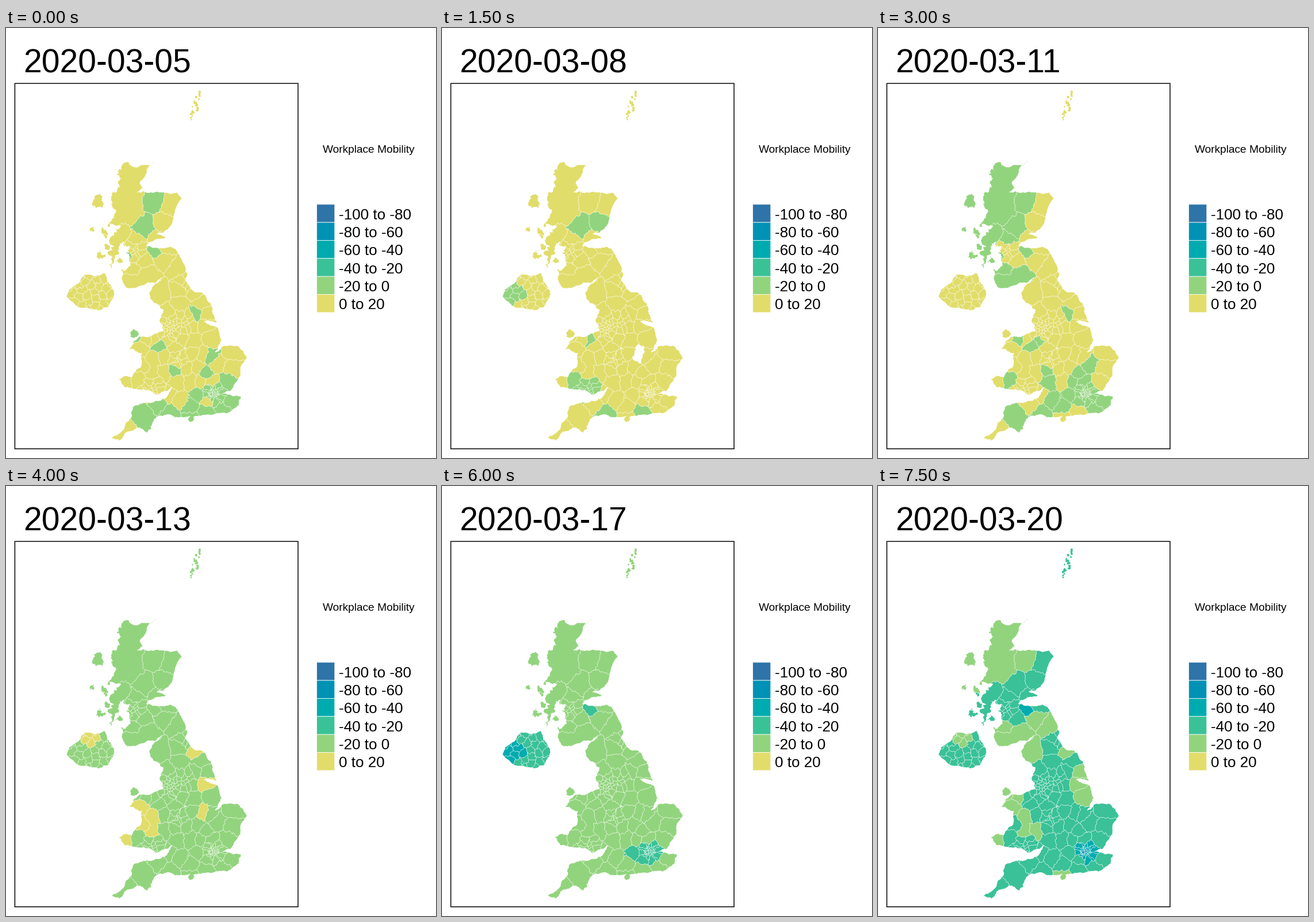
Animation, 748 px wide and 748 px high, one loop 8000 ms. Source, as a matplotlib script:

```python
import matplotlib.pyplot as plt
import numpy as np
from matplotlib.animation import FuncAnimation
from matplotlib.patches import Rectangle
from matplotlib.path import Path

SIZE, DPI, SS = 748, 100, 3
X0, Y0, W, H = 96, 100, 336, 630
PT = 72 / DPI
plt.rcParams["font.family"] = "Liberation Sans"
rng = np.random.default_rng(5)

PALETTE = ["#E2DD6A", "#92D47D", "#3AC297", "#00ABAF", "#0092B5", "#2E74A8"]


# --- Coast: a few capes and bays, roughened fractally ---
def coast(points, passes=4):
    p = np.reshape(points, (-1, 2)).astype(float)
    for _ in range(passes):
        q = np.roll(p, -1, 0)
        mid, step = (p + q) / 2, q - p
        fjord = (mid[:, 0] < 215) & (mid[:, 1] < 425) & (mid[:, 1] > 230)
        bend = np.where(fjord, .27, .09) * rng.standard_normal(len(p))
        mid += bend[:, None] * step[:, ::-1] * (1, -1)
        p = np.stack([p, mid], 1).reshape(-1, 2)
    return p


def island(x, y, r):
    a = np.arange(7) * 2 * np.pi / 7
    rad = r * rng.uniform(.6, 1.2, 7)
    return coast(np.c_[x + rad * np.cos(a), y + rad * np.sin(a)], 3)


east_coast = [
    204, 235, 266, 232, 233, 270, 238, 278, 228, 286, 250, 286, 298, 286,
    306, 296, 290, 335, 282, 350, 262, 358, 280, 364, 244, 379, 286, 380,
    300, 392, 313, 418, 322, 454, 347, 465, 357, 480, 367, 513, 345, 510,
    366, 520, 375, 543, 364, 564, 378, 553, 404, 553, 419, 574, 408, 605,
    391, 631, 376, 636, 409, 641, 405, 657, 384, 671]
west_coast = [
    335, 675, 304, 677, 265, 675, 246, 704, 228, 695, 198, 718, 183, 713,
    218, 678, 222, 658, 258, 650, 289, 625, 260, 638, 232, 629, 206, 625,
    196, 611, 234, 590, 236, 566, 214, 559, 232, 537, 262, 531, 274, 526,
    267, 507, 274, 490, 257, 478, 249, 460, 271, 434, 245, 444, 212, 453,
    201, 436, 216, 408, 209, 390, 215, 381, 205, 372, 192, 395, 182, 418,
    188, 380, 200, 344, 175, 345, 190, 322, 182, 300, 186, 285, 200, 262]
ulster = [105, 467, 137, 428, 172, 426, 189, 463, 178, 486, 154, 490, 127, 486]

shapes = [coast(east_coast + west_coast), coast(ulster)]
for skerry in ((160, 303, 13), (171, 356, 8), (150, 350, 5), (177, 382, 6),
               (164, 395, 8), (196, 405, 6), (224, 533, 9), (322, 680, 6)):
    shapes.append(island(*skerry))
for t in np.linspace(0, 1, 16):
    spread = 5 * np.sin(np.pi * t)
    shapes.append(island(337 - 15 * t + rng.normal(0, spread), 111 + 48 * t,
                         rng.uniform(2, 4.5)))

# --- Districts: nearest centre wins ---
scotland = dict(
    Highland=(225, 250, 215, 290, 215, 322, 160, 310, 182, 336),
    Moray=(261, 298), Aberdeen=(285, 305), Angus=(275, 342), Perth=(240, 348),
    Argyll=(200, 360, 165, 385, 190, 403), Stirling=(225, 370), Fife=(264, 367),
    Edinburgh=(259, 386), ELothian=(277, 384), Borders=(275, 402),
    Lanark=(240, 400), NAyrshire=(213, 395), Ayrshire=(215, 418),
    Dumfries=(215, 440, 248, 430), Shetland=(325, 135))
wales = dict(
    Anglesey=(224, 533), Gwynedd=(235, 558), Conwy=(246, 540),
    Denbigh=(258, 543), Wrexham=(266, 551), Powys=(256, 575, 256, 605),
    Ceredigion=(236, 588), Pembroke=(206, 612), Carmarthen=(230, 610))
north = dict(
    Northumberland=(299, 418), Cumbria=(268, 460), Durham=(303, 455),
    Teesside=(328, 461), NYorks=(305, 480, 338, 478), ERiding=(347, 498),
    York=(330, 497), Humber=(346, 516), Lincoln=(357, 540),
    Lancashire=(281, 498), Cheshire=(280, 541), Derby=(307, 540), Notts=(325, 545))
middle = dict(
    Staffs=(294, 557), Shropshire=(275, 572), Hereford=(275, 600),
    Worcester=(294, 594), Warwick=(313, 591), Leicester=(325, 567),
    Rutland=(343, 570), Northants=(333, 588), Peterborough=(355, 573),
    Cambridge=(365, 585), Norfolk=(395, 563), Suffolk=(393, 592),
    Essex=(385, 614), Bedford=(348, 602), Herts=(358, 616), Bucks=(338, 615))
south = dict(
    Oxford=(321, 615), Gloucester=(298, 616), Bristol=(282, 637),
    Wiltshire=(302, 647), Somerset=(265, 653), Devon=(240, 674),
    Cornwall=(205, 700), Dorset=(285, 670), Hampshire=(322, 658),
    WSussex=(348, 666), ESussex=(378, 664), Surrey=(351, 648),
    Kent=(390, 650), Berkshire=(335, 637), Wight=(322, 680))
# Dense groups of small districts: x, y, radius, count
clusters = dict(
    Glasgow=(225, 388, 10, 9), Tyne=(315, 442, 6, 5), Leeds=(311, 513, 13, 11),
    Manchester=(285, 522, 15, 24), Birmingham=(299, 577, 8, 9),
    SWales=(256, 627, 13, 12), London=(361, 635, 10, 36), Ulster=(148, 459, 40, 30))

centres = [(name, xy) for area in (scotland, wales, north, middle, south)
           for name, flat in area.items() for xy in np.reshape(flat, (-1, 2))]
for name, (x, y, radius, n) in clusters.items():
    for i in range(n):
        r, a = radius * ((i + .5) / n) ** .5, 2.4 * i
        part = name
        if name == "Ulster":
            part += "ESWN"[int(a / (np.pi / 2) + .5) % 4]
        elif name == "London" and r < 4:
            part = "City"
        centres.append((part, (x + r * np.cos(a), y + r * np.sin(a))))
names = list(dict.fromkeys(name for name, _ in centres))

gx, gy = np.meshgrid(X0 + (np.arange(W * SS, dtype="f4") + .5) / SS,
                     Y0 + (np.arange(H * SS, dtype="f4") + .5) / SS)


def noise():
    out = np.zeros_like(gx)
    for wave in np.geomspace(4, 22, 12):
        a, p = rng.uniform(0, 2 * np.pi, 2)
        kx, ky = 2 * np.pi / wave * np.cos(a), 2 * np.pi / wave * np.sin(a)
        out += wave ** .5 * np.sin(np.float32(kx) * gx + np.float32(ky) * gy
                                   + np.float32(p))
    return out / 8


def window(xa, ya, xb, yb):
    def cut(a, b, o, n):
        return slice(max(0, int((a - o) * SS)), min(n, int((b - o) * SS)))
    return cut(ya, yb, Y0, H * SS), cut(xa, xb, X0, W * SS)


wx, wy = gx + noise(), gy + noise()
best = np.full(gx.shape, 1e9, "f4")
cell = np.zeros(gx.shape, int)
for i, (_, (x, y)) in enumerate(centres):
    w = window(x - 75, y - 75, x + 75, y + 75)
    d = (wx[w] - x) ** 2 + (wy[w] - y) ** 2
    near = d < best[w]
    best[w][near] = d[near]
    cell[w][near] = i

# Merge the cells of one district, but keep clusters divided
several = [name in scotland or name in wales or name in north for name, _ in centres]
first = [next(j for j, c in enumerate(centres) if c[0] == name) if merge else i
         for i, ((name, _), merge) in enumerate(zip(centres, several))]
cell = np.array(first)[cell]

land = np.zeros(gx.shape, bool)
for shape in shapes:
    w = window(*(shape.min(0) - 2), *(shape.max(0) + 2))
    p = np.c_[gx[w].ravel(), gy[w].ravel()]
    land[w] |= Path(shape).contains_points(p).reshape(gx[w].shape)
cell[~land] = -1

# White hairlines between neighbours
edge = np.zeros_like(land)
dx, dy = cell[:, 1:] != cell[:, :-1], cell[1:] != cell[:-1]
edge[:, 1:] |= dx
edge[:, :-1] |= dx
edge[1:] |= dy
edge[:-1] |= dy
cell[edge] = -1

# --- Days: the common class, then the districts that differ ---
CAPITAL = "London City Berkshire "
SOUTH = "Devon Dorset Hampshire ESussex Kent "
mar11 = (CAPITAL + SOUTH + "Highland Argyll Moray Perth Stirling NAyrshire "
         "Ayrshire Dumfries Edinburgh York Conwy Wrexham Cheshire Worcester "
         "Gloucester Carmarthen Cambridge Bedford Bucks Herts Surrey Wiltshire ")
mar18 = (CAPITAL + "Shetland Perth Stirling Edinburgh ELothian Tyne UlsterW "
         "York Manchester Cheshire Warwick Oxford Bucks Herts Essex Cambridge "
         "Bedford Surrey Hampshire WSussex Wiltshire Bristol ")
days = [
    (0, {1: CAPITAL + SOUTH + "Moray Perth Edinburgh NAyrshire York Anglesey "
         "Wrexham Worcester Bedford Peterborough Essex Somerset WSussex Wight"}),
    (0, {1: "UlsterW Cornwall Perth Worcester York City"}),
    (0, {1: "UlsterW Perth"}),
    (0, {1: "Perth Angus UlsterW Carmarthen SWales Denbigh Dorset WSussex",
         -1: "Rutland"}),
    (0, {1: CAPITAL + "Perth Moray Edinburgh York Devon Worcester Bedford Surrey"}),
    (0, {1: CAPITAL + "Argyll Perth Moray Edinburgh York Worcester Bedford Surrey"}),
    (0, {1: mar11}),
    (0, {1: mar11 + "Essex Oxford WSussex Somerset Warwick"}),
    (1, {0: "UlsterN Teesside Humber Rutland Gwynedd Ceredigion Powys Pembroke"}),
    (1, {0: "UlsterN Cornwall Norfolk Suffolk Lincoln Humber Teesside Gwynedd "
         "Anglesey Denbigh Pembroke", -1: "Rutland"}),
    (1, {0: "Argyll Fife Teesside Humber Lincoln Peterborough Anglesey Gwynedd "
         "Denbigh Pembroke", -1: "Rutland"}),
    (1, {2: "UlsterW City"}),
    (1, {2: CAPITAL + "UlsterN UlsterE UlsterS Edinburgh Surrey", 3: "UlsterW"}),
    (1, {2: mar18}),
    (1, {2: mar18 + SOUTH + "Somerset Gloucester Northants Leeds Durham Fife"}),
    (2, {1: "Highland Moray Borders Ayrshire Dumfries Northumberland Cumbria "
         "Teesside ERiding Humber Lincoln UlsterN Anglesey Gwynedd Conwy Powys "
         "Pembroke Hereford Wight", 3: "Edinburgh London", 4: "City"}),
]
rgb = np.array([[int(c[i:i + 2], 16) / 255 for i in (1, 3, 5)]
                for c in PALETTE + ["#FFFFFF"]], "f4")


def paint(day):
    base, odd = days[day]
    level = dict.fromkeys(names, base)
    for cls, group in odd.items():
        level.update(dict.fromkeys(group.split(), cls))
    table = rgb[[level[name] for name, _ in centres] + [-1]]
    return table[cell].reshape(H, SS, W, SS, 3).mean((1, 3))


fig = plt.figure(figsize=(SIZE / DPI, SIZE / DPI), dpi=DPI, facecolor="white")
ax = fig.add_axes([0, 0, 1, 1])
ax.axis("off")
chart = ax.imshow(paint(0), extent=(X0, X0 + W, Y0 + H, Y0), aspect="auto",
                  interpolation="nearest")
ax.set(xlim=(0, SIZE), ylim=(SIZE, 0))


def write(x, y, s, px):
    return ax.text(x, y, s, fontsize=px * PT, va="baseline")


def box(x, y, w, h, **style):
    ax.add_patch(Rectangle((x, y), w, h, snap=False, **style))


box(15.4, 96.4, 492.6, 635.6, fill=False, lw=1.5 * PT)
title = write(30, 77, "", 57)
write(551, 217, "Workplace Mobility", 19.1)
for i, color in enumerate(PALETTE[::-1]):
    y, low = 306.8 + 31.35 * i, 20 * i - 100
    box(540.5, y, 31.3, 31.35, fc=color, ec="white", lw=.8 * PT)
    write(579, y + 25.8, f"{low} to {low + 20}", 26)


def update(day):
    chart.set_data(paint(day))
    title.set_text(f"2020-03-{day + 5:02d}")
    return chart, title


anim = FuncAnimation(fig, update, frames=len(days), interval=500, repeat=True,
                     repeat_delay=0)
plt.show()
```
